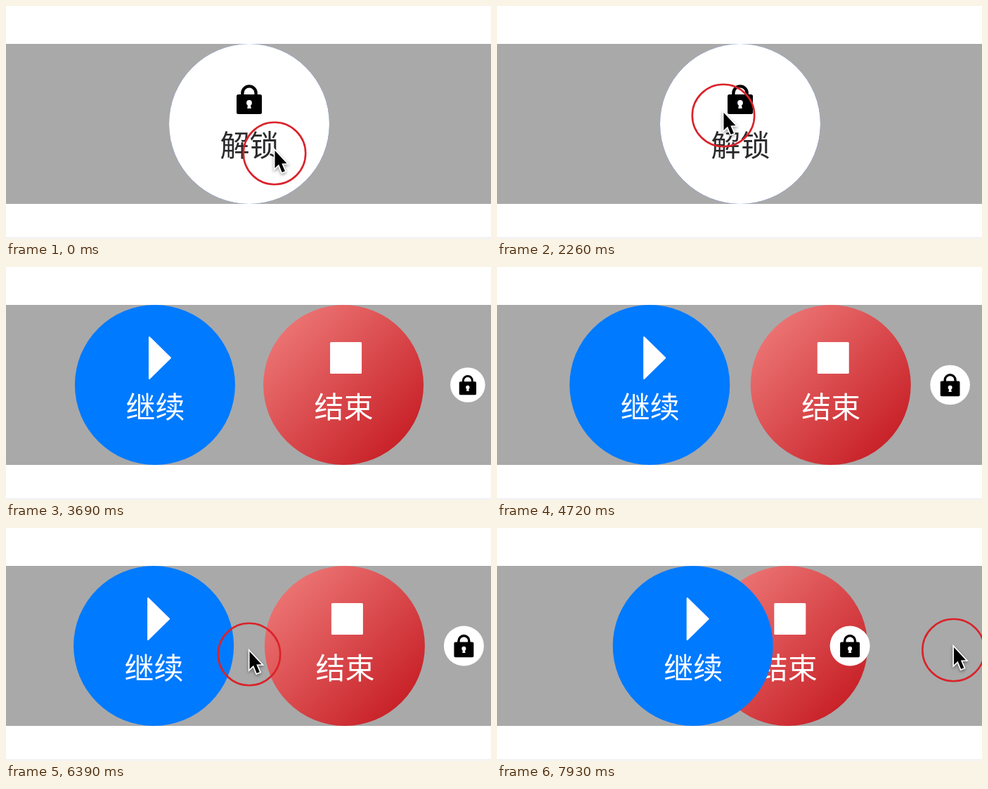
Write an HTML page with a canvas that moves like this. It is 690 px wide and 332 px high and loops after 8000 ms.

```html
<!DOCTYPE html>
<html lang="zh-CN">
<head>
<meta charset="utf-8">
<title>解锁</title>
<style>
html, body { margin: 0; width: 100%; height: 100%; overflow: hidden; background: #fff; }
canvas { display: block; width: 690px; height: 332px; }
</style>
</head>
<body>
<canvas id="stage"></canvas>
<script>
const LOOP = 8000, STEP = 128.4;
const CX = 346, CY = 168, R = 114, SMALL_R = 28.5;
const SPREAD = 128.5, LOCK_GAP = 169.5;
const FONT = '500 42px "Noto Sans CJK SC", "Noto Sans CJK", sans-serif';

const canvas = document.getElementById('stage');
const ctx = canvas.getContext('2d');
const ratio = window.devicePixelRatio || 1;
canvas.width = 690 * ratio;
canvas.height = 332 * ratio;

const clamp = v => Math.min(1, Math.max(0, v));

// Fast rise, one overshoot, slow settling; larger shape means a smaller overshoot.
function settle(ms, rate, shape) {
  const tau = Math.max(0, ms) / 1000 * rate;
  return 1 + (tau / shape - 1) * Math.exp(-tau);
}

const remaining = ms => Math.pow(1 - clamp(ms / 360), 3);

// The picture advances in held steps.
function held(t) {
  const i = Math.floor((t - 590) / STEP);
  return i < 0 ? 0 : 610 + i * STEP;
}

function layout(t) {
  if (t < 4800) {
    const p = settle(t - 2928, 4.2, 1.55);
    return { spread: p, out: p, r: R - (R - SMALL_R) * p };
  }
  if (t < 6153) return { spread: remaining(t - 4800), out: 1, r: SMALL_R };
  if (t < 7859) return { spread: settle(t - 6153, 10.5, 1.47), out: 1, r: SMALL_R };
  const p = remaining(t - 7859);
  return { spread: p, out: p, r: SMALL_R };
}

// Pointer path: time, x, y
const PATH = [
  [500, 382, 210], [735, 354, 190], [1270, 354, 190], [1890, 322, 152],
  [2020, 322, 152], [2140, 322, 156], [4800, 278, 180], [5110, 278, 180],
  [5615, 346, 180], [7160, 346, 180], [7800, 649.5, 174]
];

function pointer(t) {
  if (t > 2920 && t < 4800) return null;
  if (t < 4800 && t > 2140) return [322, 156];
  const next = PATH.findIndex(k => k[0] > t);
  if (next === 0) return PATH[0].slice(1);
  if (next < 0) return PATH[PATH.length - 1].slice(1);
  const a = PATH[next - 1], b = PATH[next];
  const u = (t - a[0]) / (b[0] - a[0]);
  const e = u * u * (3 - 2 * u);
  return [a[1] + (b[1] - a[1]) * e, a[2] + (b[2] - a[2]) * e];
}

function disc(x, y, r, fill) {
  ctx.fillStyle = fill;
  ctx.beginPath();
  ctx.arc(x, y, Math.max(0, r), 0, Math.PI * 2);
  ctx.fill();
}

function polygon(points) {
  ctx.beginPath();
  points.forEach(([x, y]) => ctx.lineTo(x, y));
  ctx.closePath();
}

function label(text, x, y, color) {
  ctx.font = FONT;
  ctx.textAlign = 'center';
  ctx.textBaseline = 'alphabetic';
  ctx.fillStyle = color;
  ctx.fillText(text, x, y);
}

function endButton(x) {
  const g = ctx.createLinearGradient(x - R, CY - R, x + R, CY + R);
  g.addColorStop(0, '#f28280');
  g.addColorStop(1, '#c1121a');
  disc(x, CY, R, g);
  ctx.fillStyle = '#fff';
  ctx.beginPath();
  ctx.roundRect(x - 19, 107, 45, 45, 1.5);
  ctx.fill();
  label('结束', x + 0.5, 215, '#fff');
}

function continueButton(x) {
  disc(x, CY, R, '#007aff');
  ctx.fillStyle = ctx.strokeStyle = '#fff';
  ctx.lineWidth = 2;
  ctx.lineJoin = 'round';
  polygon([[x - 8, 100], [x + 22, 129.5], [x - 8, 159]]);
  ctx.fill();
  ctx.stroke();
  label('继续', x + 0.5, 215, '#fff');
}

function lockIcon(x, y, scale) {
  ctx.save();
  ctx.translate(x, y);
  ctx.scale(scale, scale);
  ctx.strokeStyle = ctx.fillStyle = '#000';
  ctx.lineWidth = 4.4;
  ctx.beginPath();
  ctx.moveTo(-9.6, -4);
  ctx.lineTo(-9.6, -9);
  ctx.arc(0, -9, 9.6, Math.PI, 0);
  ctx.lineTo(9.6, -4);
  ctx.stroke();
  ctx.beginPath();
  ctx.roundRect(-18, -7, 36, 28, 2.5);
  ctx.fill();
  disc(0, 5, 3.9, '#fff');
  polygon([[-1.6, 6], [1.6, 6], [2.8, 13], [-2.8, 13]]);
  ctx.fill();
  ctx.restore();
}

function lockButton(x, r, out) {
  const moved = clamp(out);
  disc(x, CY, r, '#fff');
  const grown = r > SMALL_R + 0.1;
  lockIcon(x, grown ? 133 + 35 * moved : CY, Math.min(1, r * 0.98 / 36));
  const alpha = grown ? clamp(1 - 3 * moved) : 0;
  if (alpha > 0) {
    ctx.globalAlpha = alpha;
    label('解锁', x + 0.5, 214, '#2b2b2d');
    ctx.globalAlpha = 1;
  }
}

function drawPointer([x, y]) {
  ctx.strokeStyle = '#d9232a';
  ctx.lineWidth = 2.6;
  ctx.beginPath();
  ctx.arc(x, y, 44.2, 0, Math.PI * 2);
  ctx.stroke();

  ctx.save();
  ctx.translate(x + 0.5, y - 4);
  polygon([[0, 0], [0, 25], [5.6, 19.8], [10.2, 31], [14.4, 29.2], [9.8, 18.4], [17, 18.2]]);
  ctx.shadowColor = 'rgba(0,0,0,.4)';
  ctx.shadowBlur = 4 * ratio;
  ctx.shadowOffsetY = 2 * ratio;
  ctx.lineJoin = 'miter';
  ctx.strokeStyle = '#fff';
  ctx.lineWidth = 3.4;
  ctx.stroke();
  ctx.shadowColor = 'transparent';
  ctx.fillStyle = '#000';
  ctx.fill();
  ctx.restore();
}

function draw(time) {
  const t = held(time % LOOP);
  const { spread, out, r } = layout(t);
  const shift = SPREAD * spread;

  ctx.setTransform(ratio, 0, 0, ratio, 0, 0);
  ctx.fillStyle = '#fff';
  ctx.fillRect(0, 0, 690, 332);
  ctx.fillStyle = '#a9a9a9';
  ctx.fillRect(0, 54, 690, 228);
  ctx.fillStyle = '#f3f3f3';
  ctx.fillRect(0, 329, 690, 3);

  endButton(CX + shift);
  continueButton(CX - shift);
  lockButton(CX + shift + LOCK_GAP * out, r, out);
  const at = pointer(t);
  if (at) drawPointer(at);
}

const start = performance.now();
function tick() {
  draw(performance.now() - start);
  requestAnimationFrame(tick);
}
tick();
</script>
</body>
</html>
```
